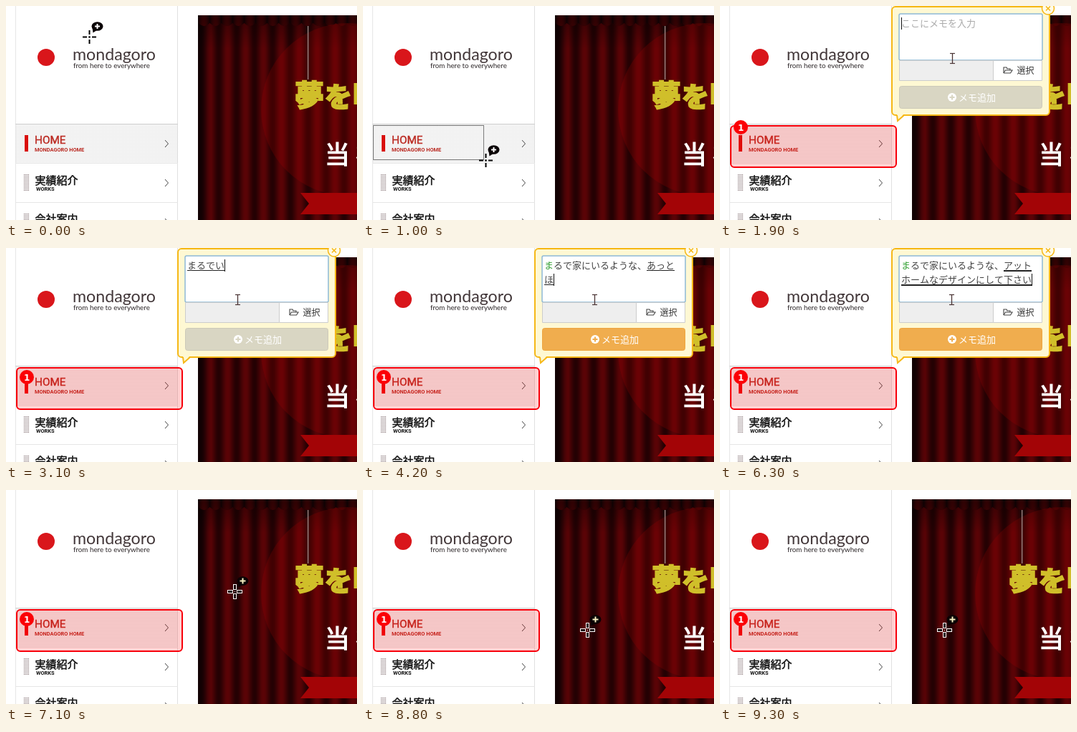
Animation of 490x300 px, one loop 9800 ms. Source, as an HTML page with a canvas:

```html
<!DOCTYPE html>
<html lang="ja">
<head>
<meta charset="utf-8">
<title>Memo demo</title>
<style>
  html, body { margin: 0; width: 100%; height: 100%; overflow: hidden; background: #fff; }
  canvas { display: block; }
</style>
</head>
<body>
<canvas id="stage" width="490" height="300"></canvas>
<script>
const LOOP = 9800, STEP = 100;
const JP = '"Noto Sans CJK JP", "Noto Sans CJK", sans-serif';
const CELL = 13, PER_LINE = 14, TEXT_X = 253;
const stage = document.getElementById('stage');
const screen = stage.getContext('2d');
let ctx = screen;

function text(str, x, y, font, color, weight = 0) {
  ctx.font = font;
  ctx.fillStyle = color;
  ctx.fillText(str, x, y);
  if (!weight) return;
  ctx.strokeStyle = color;
  ctx.lineWidth = weight;
  ctx.strokeText(str, x, y);
}

function rect(x, y, w, h, color) {
  ctx.fillStyle = color;
  ctx.fillRect(x, y, w, h);
}

function disc(x, y, r, color) {
  ctx.fillStyle = color;
  ctx.beginPath();
  ctx.arc(x, y, r, 0, Math.PI * 2);
  ctx.fill();
}

function poly(points, fill) {
  ctx.beginPath();
  points.forEach(([x, y]) => ctx.lineTo(x, y));
  if (fill) {
    ctx.fillStyle = fill;
    ctx.fill();
  }
}

function line(points, color, width = 1) {
  poly(points);
  ctx.strokeStyle = color;
  ctx.lineWidth = width;
  ctx.stroke();
}

function box(x, y, w, h, r, fill, stroke, width = 1) {
  ctx.beginPath();
  ctx.roundRect(x, y, w, h, r);
  ctx.fillStyle = fill;
  ctx.fill();
  if (!stroke) return;
  ctx.strokeStyle = stroke;
  ctx.lineWidth = width;
  ctx.stroke();
}

function plus(x, y, r, color, width = 2) {
  rect(x - r, y - width / 2, r * 2, width, color);
  rect(x - width / 2, y - r, width, r * 2, color);
}

function halftone(x0, y0, w, h, gap, color) {
  for (let y = 0; y < h; y += gap)
    for (let x = 0; x < w; x += gap) rect(x0 + x, y0 + y, 1, 1, color);
}

// ---- page ----
function drawSidebar() {
  disc(56, 72, 12, '#d9161b');
  text('mondagoro', 93, 76, '23.2px Lato, sans-serif', '#43383a');
  text('from here to everywhere', 94, 87, '9.8px Lato, sans-serif', '#2c2628');

  rect(14, 166, 225, 54, '#f9f9f9');
  halftone(14, 166, 225, 54, 2, '#dedede');
  rect(13, 0, 1, 300, '#e6e6e6');
  rect(239, 0, 1, 300, '#e0e0e0');
  rect(13, 165, 227, 1, '#d2d2d2');
  rect(13, 220, 227, 1, '#e6e6e6');
  rect(13, 275, 227, 1, '#e6e6e6');

  const small = 'bold 7.4px Roboto, sans-serif';
  rect(26, 181, 5, 23, '#d90d0a');
  text('HOME', 40, 193, '15.3px Roboto, sans-serif', '#bb2a22', 0.4);
  text('MONDAGORO HOME', 40, 204, small, '#bb2a22');
  text('実績紹介', 40.5, 250, '15px ' + JP, '#111', 0.45);
  text('WORKS', 42, 259, small, '#111');
  text('会社案内', 40.5, 304, '15px ' + JP, '#111', 0.45);
  for (const y of [236, 291]) halftone(25, y, 7, 24, 2, '#6b5558');
  for (const y of [193, 248, 303])
    line([[222, y - 5], [226.5, y], [222, y + 5]], '#444', 1);
}

function drawCurtain() {
  ctx.save();
  ctx.beginPath();
  ctx.rect(268, 13, 222, 287);
  ctx.clip();
  for (let x = 268; x < 490; x++) {
    const fold = 0.5 + 0.5 * Math.cos((x - 434) * Math.PI / 12.5);
    const shade = Math.min(1, (x - 256) / 30);
    rect(x, 13, 1, 287, `rgb(${(36 + 54 * fold) * shade}, ${1 + 2 * fold}, ${3 + 3 * fold})`);
    const frill = Math.abs(Math.sin((x - 268) * Math.PI / 16));
    rect(x, 13, 1, 11 + 4 * frill, `rgb(${24 + 50 * frill}, 3, 5)`);
  }
  const dusk = ctx.createLinearGradient(0, 13, 0, 60);
  dusk.addColorStop(0, 'rgba(0,0,0,.4)');
  dusk.addColorStop(1, 'rgba(0,0,0,0)');
  rect(268, 13, 222, 47, dusk);
  disc(477, 145, 121, 'rgba(165,0,2,.22)');
  rect(421, 28, 1.3, 75, '#a08e8c');

  const gold = '#d0bf2a';
  text('夢', 403, 140, '900 41px ' + JP, gold, 2.2);
  text('を', 445, 141, '900 38px ' + JP, gold, 2.6);
  text('叶', 484, 140, '900 41px ' + JP, gold, 2.2);
  text('当', 445, 221, '35px ' + JP, '#fff', 1.2);
  text('社', 488, 221, '35px ' + JP, '#fff');
  poly([[411, 262], [490, 262], [490, 292], [411, 292], [423, 277]], '#a30406');
  ctx.restore();
}

function makePage() {
  const page = document.createElement('canvas');
  page.width = 490;
  page.height = 300;
  ctx = page.getContext('2d');
  rect(0, 0, 490, 300, '#fff');
  drawSidebar();
  drawCurtain();
  ctx = screen;
  return page;
}

// ---- memo text ----
const READING = 'まるでいえにいるような、';
const LEAD = 'まるで家にいるような、';
const KANA = 'あっとほーむなでざいんにしてください';
const FINAL = 'アットホームなデザインにして下さい';
// when each further kana shows up, in tenths of a second
const KEYS = [40, 41, 42, 42, 43, 45, 46, 49, 51, 52, 53, 54, 56, 57, 58, 59, 60, 61];

function memoAt(t) {
  if (t < 2900) return { str: '', from: 0 };
  if (t < 4000) return { str: READING.slice(0, Math.ceil((t - 2800) / 100 * 1.2)), from: 0 };
  if (t < 6300) {
    const count = KEYS.filter(k => k * 100 <= t).length;
    return { str: LEAD + KANA.slice(0, count), from: LEAD.length };
  }
  const str = LEAD + FINAL;
  return { str, from: t < 6500 ? LEAD.length : str.length };
}

function drawMemo(t) {
  const { str, from } = memoAt(t);
  const font = CELL + 'px ' + JP;
  if (!str) text('ここにメモを入力', TEXT_X, 29, font, '#aaa');
  [...str].forEach((ch, i) => {
    const x = TEXT_X + i % PER_LINE * CELL;
    const y = 29 + Math.floor(i / PER_LINE) * 20;
    text(ch, x, y, font, t >= 4000 && i === 0 ? '#35a135' : '#444');
    if (i >= from) rect(x, y + 2, CELL, t >= 6300 ? 2 : 1, '#222');
  });
  const row = Math.max(0, Math.ceil(str.length / PER_LINE) - 1);
  const col = str.length - row * PER_LINE;
  rect(TEXT_X + col * CELL, 16 + row * 20, 1, 17, '#111');
}

// ---- popup and marker ----
function drawPopup(t) {
  const amber = '#f6b817', cream = '#fef8d3';
  box(240, 1, 220, 152, 5, cream, amber, 2);
  poly([[247, 151], [248, 161], [257, 151]], cream);
  line([[247, 153], [248, 161], [257, 153]], amber, 2);
  ctx.beginPath();
  ctx.arc(458, 3.5, 8.5, 0, Math.PI * 2);
  ctx.fillStyle = '#fffbe8';
  ctx.fill();
  ctx.strokeStyle = amber;
  ctx.lineWidth = 1.5;
  ctx.stroke();
  line([[455, 0.5], [461, 6.5]], amber, 1.5);
  line([[461, 0.5], [455, 6.5]], amber, 1.5);

  box(250, 11, 200, 65, 2, '#fff', '#8db9d6', 1.5);
  box(250.5, 76.5, 131, 28, 0, '#eee', '#ccc');
  box(381.5, 76.5, 68, 28, 0, '#fff', '#ccc');
  line([[396, 94], [396, 86], [400, 86], [401, 88], [405, 88], [405, 90]], '#444', 1.1);
  line([[396, 94], [398.5, 90], [408, 90], [405.5, 94], [396, 94]], '#444', 1.1);
  text('選択', 414.5, 95, '12px ' + JP, '#333');

  const enabled = t >= 4000;
  const fill = enabled ? '#f0ad4e' : '#d9d6c3';
  box(250.5, 112.5, 199, 31, 3, fill, enabled ? '#eea53e' : '#ccc9b8');
  disc(324, 128, 6, '#fff');
  plus(324, 128, 3.5, fill);
  text('メモ追加', 333, 133, CELL + 'px ' + JP, '#fff');
  drawMemo(t);
}

function drawMarker(t) {
  box(15, 168, 231, 58, 5, 'rgba(255,0,0,.18)', '#f8000a', 2);
  if (t < 1800) return;
  const y = t < 2000 ? 170 : t < 2100 ? 176 : 181;
  if (y > 180) rect(26, 181, 5, 23, '#f00006');
  disc(29, y, 10, '#fb0006');
  text('1', 25, y + 4.5, 'bold 12px "DejaVu Sans", sans-serif', '#fff');
}

// ---- mouse ----
const PATH = [
  [0, 116, 43], [600, 14, 167], [700, 14, 167], [1000, 171, 216], [1250, 245, 226],
  [1400, 245, 226], [1800, 324, 73], [4000, 323, 72], [6400, 323, 72],
  [6700, 320, 128], [6900, 320, 130], [7100, 319, 142], [7200, 319, 142],
  [7600, 313, 196], [LOOP, 313, 196]
];

function mouseAt(t) {
  const i = PATH.findIndex(p => p[0] > t);
  const [t0, x0, y0] = PATH[i - 1], [t1, x1, y1] = PATH[i];
  const p = (t - t0) / (t1 - t0);
  const k = t0 === 0 ? p * p * (3 - 2 * p) : p;
  return [Math.round(x0 + (x1 - x0) * k), Math.round(y0 + (y1 - y0) * k)];
}

function drawCross(x, y) {
  const dark = x > 268 && y > 13;
  ctx.save();
  ctx.translate(x + 0.5, y + 0.5);
  if (dark) {
    ctx.strokeStyle = '#fff';
    ctx.lineWidth = 1;
    for (let i = 0; i < 4; i++) {
      rect(-2, -10, 4, 7, '#180204');
      ctx.strokeRect(-2, -10, 4, 7);
      ctx.rotate(Math.PI / 2);
    }
    rect(-0.5, -0.5, 1, 1, '#fff');
  } else {
    ctx.setLineDash([6, 2.5, 2, 2.5]);
    line([[-9.5, 0], [9.5, 0]], '#000', 2);
    line([[0, -9.5], [0, 9.5]], '#000', 2);
    ctx.setLineDash([]);
  }
  ctx.fillStyle = '#0a0204';
  ctx.beginPath();
  ctx.ellipse(11, -15, 8, 6.3, 0, 0, Math.PI * 2);
  ctx.fill();
  poly([[4, -13], [5, -6], [11, -10]], '#0a0204');
  plus(11, -15, dark ? 4 : 3.5, dark ? '#f6efc0' : '#fff');
  ctx.restore();
}

function drawBeam(x, y) {
  const color = '#4a3434';
  line([[x + 0.5, y - 6], [x + 0.5, y + 7]], color, 1.3);
  for (const dy of [-6.5, 7.5]) line([[x - 3, y + dy], [x + 4, y + dy]], color, 1.2);
}

function drawArrow(x, y) {
  const shape = [[x, y], [x, y + 14], [x + 3.5, y + 11], [x + 6, y + 16],
    [x + 8, y + 15], [x + 5.8, y + 10], [x + 10, y + 10], [x, y]];
  poly(shape, '#fff');
  line(shape, '#222');
}

function drawSelection(x, y) {
  ctx.setLineDash([1, 1]);
  ctx.strokeStyle = '#000';
  ctx.lineWidth = 1;
  ctx.strokeRect(14.5, 167.5, x - 17, y - 168);
  ctx.setLineDash([]);
}

const page = makePage();

function draw(t) {
  const [x, y] = mouseAt(t);
  const open = t >= 1500 && t < 6900;
  ctx.drawImage(page, 0, 0);
  if (t >= 800 && t < 1400) drawSelection(x, y);
  if (t >= 1400) drawMarker(t);
  if (t >= 1800 && t < 2000) disc(345, 144, 10, '#e0141c');
  if (open) drawPopup(t);
  const over = open && x > 240 && x < 460 && y < 154;
  if (!over) drawCross(x, y);
  else if (y < 76) drawBeam(x, y);
  else drawArrow(x, y);
}

const start = performance.now();
function frame() {
  const t = (performance.now() - start) % LOOP;
  draw(Math.floor(t / STEP) * STEP);
  requestAnimationFrame(frame);
}
frame();
</script>
</body>
</html>
```
